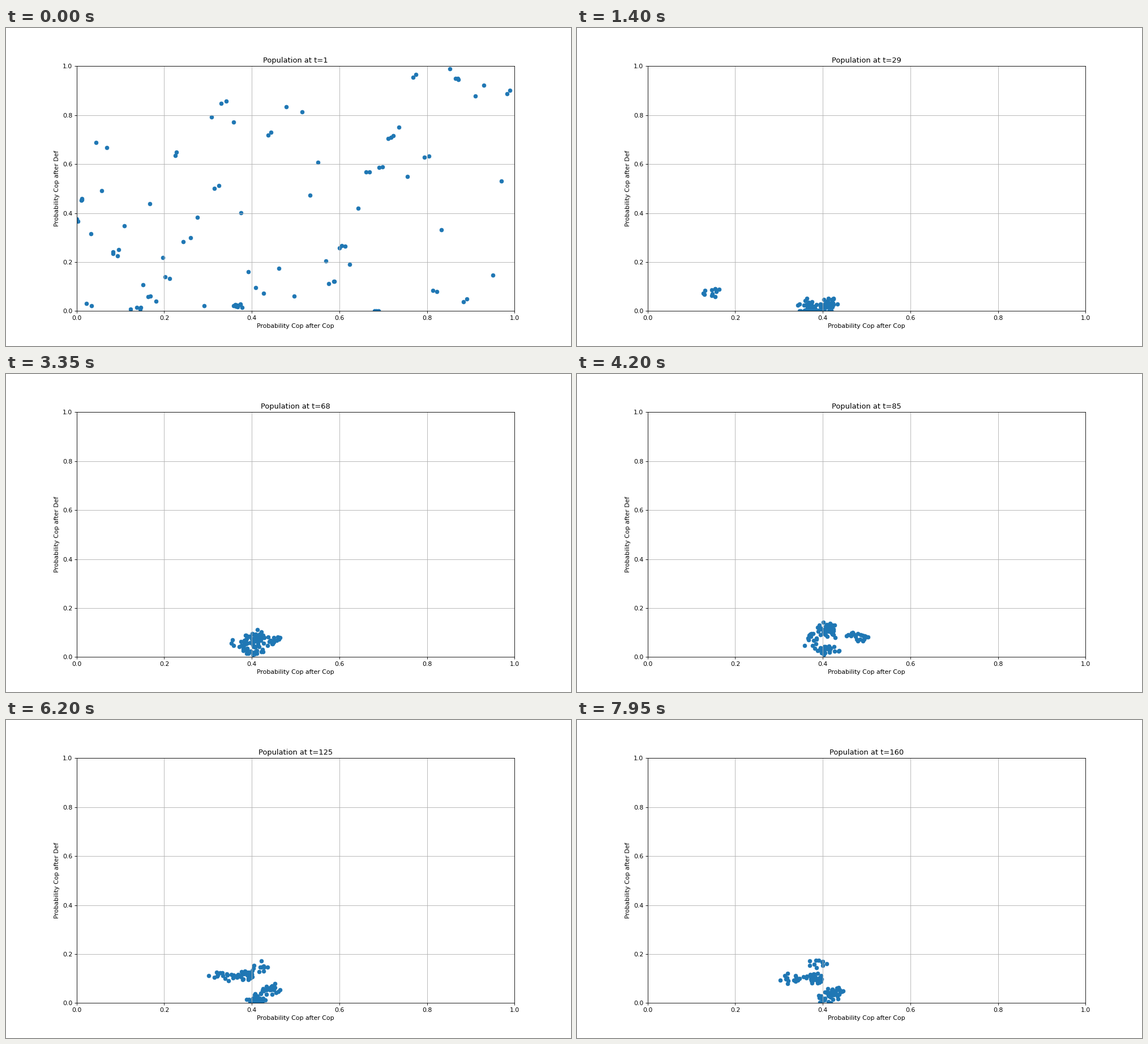
A matplotlib script for the animation above (8 s loop, 998 by 561 pixels).

```python
import numpy as np
import matplotlib.pyplot as plt
from matplotlib.animation import FuncAnimation

W, H, DPI = 998, 561, 78
FRAMES, STEP_MS = 160, 50
N = 100
rng = np.random.default_rng(12)

# The two places from which the surviving strategies spread
ANCESTOR, OUTSIDER = (.37, .025), (.165, .06)

# Drift of each colony's centre through a few key points
KEY_FRAMES = [0, 28, 49, 84, 124, 159]
COLONIES = [
    [ANCESTOR, (.36, .012), (.365, .035), (.37, .085), (.325, .112), (.325, .09)],
    [ANCESTOR, (.41, .015), (.40, .06), (.413, .132), (.425, .163), (.38, .165)],
    [ANCESTOR, (.39, .015), (.40, .05), (.41, .12), (.375, .11), (.378, .10)],
    [ANCESTOR, (.43, .035), (.415, .065), (.485, .085), (.432, .05), (.425, .045)],
    [ANCESTOR, (.40, .005), (.395, .03), (.415, .03), (.41, .01), (.412, .03)],
    [OUTSIDER] + [(.138, .08)] * 5,
]
SIZES = [13, 10, 16, 22, 26, 13]
MIDDLE, REMOTE = 2, 5
RENEWAL = .12


def mutate(pts, size):
    return np.clip(pts + rng.uniform(-size, size, np.shape(pts)), 0, 1)


def first_generation():
    """Scattered parents with a few children close by, then the founders."""
    n = 60
    parents = np.c_[(rng.permutation(n) + .5) / n, (rng.permutation(n) + .5) / n]
    parents **= [1.2, 1.35]
    kids = mutate(parents[rng.integers(0, n, 30)], .012)
    main = mutate(np.tile(ANCESTOR, (8, 1)), .012)
    remote = mutate(np.tile(OUTSIDER, (2, 1)), .003)
    return np.vstack([parents, kids, main, remote])


def lifetimes(pts):
    """Cooperators die out first; founders never do."""
    life = 1 + 24 * np.exp(-1.5 * np.hypot(*pts.T)) * rng.uniform(.5, 1, N)
    life[-10:] = np.inf
    return np.floor(life)


def centres(group, f):
    keys = np.array(COLONIES)
    now = [[np.interp(f, KEY_FRAMES, xy) for xy in c.T] for c in keys]
    return np.array(now)[group]


def offsets():
    """Random points in a flat disc."""
    angle = rng.uniform(0, 2 * np.pi, N)
    radius = np.sqrt(rng.random(N))
    return np.c_[.024 * radius * np.cos(angle), .021 * radius * np.sin(angle)]


def evolve():
    pos = first_generation()
    life = lifetimes(pos)
    group = rng.permutation(np.repeat(np.arange(len(SIZES)), SIZES))
    leave = rng.integers(30, 67, N)
    history = [pos.copy()]
    for f in range(1, FRAMES):
        for i in np.flatnonzero(life == f):
            j = rng.choice(np.flatnonzero(life > f))
            pos[i], life[i] = mutate(pos[j], .012), life[j]
        leaving = (group == REMOTE) & (leave == f)
        group[leaving] = MIDDLE
        renew = np.isinf(life) & ((rng.random(N) < RENEWAL) | leaving)
        place = np.clip(centres(group, f) + offsets(), 0, 1)
        pos[renew] = place[renew]
        history.append(pos.copy())
    return history


history = evolve()

fig, ax = plt.subplots(figsize=((W + .001) / DPI, (H + .001) / DPI), dpi=DPI)
dots = ax.scatter(*history[0].T)
ax.set(xlim=(0, 1), ylim=(0, 1),
       xlabel="Probability Cop after Cop", ylabel="Probability Cop after Def")
ax.grid(True)
title = ax.set_title("Population at t=1")


def draw(f):
    dots.set_offsets(history[f])
    title.set_text(f"Population at t={f + 1}")
    return dots, title


anim = FuncAnimation(fig, draw, frames=FRAMES, interval=STEP_MS,
                     repeat=True, repeat_delay=0)
plt.show()
```
